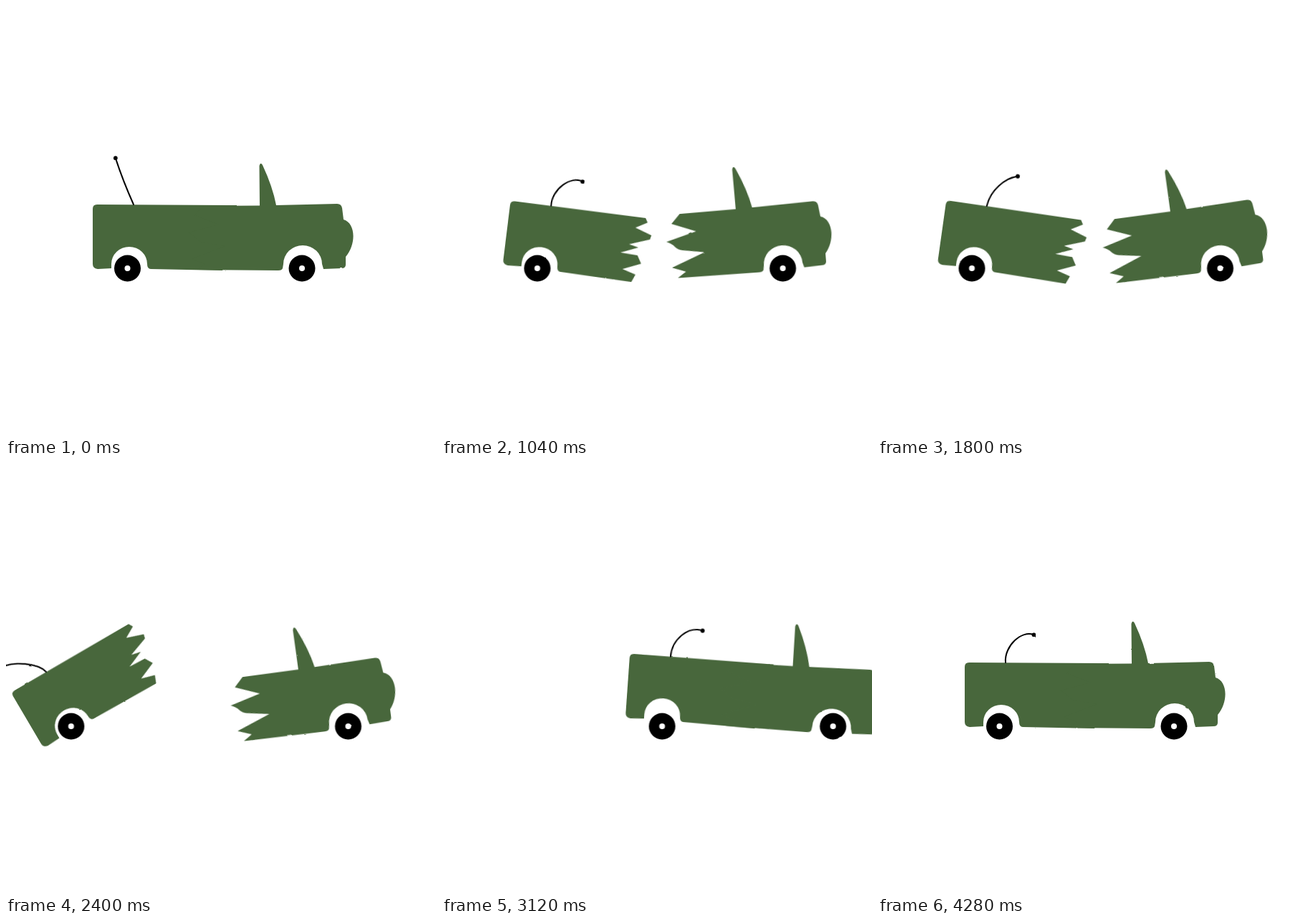
Animation, 600 px wide and 600 px high, one loop 4320 ms. Source, as an HTML page without scripts:

```html
<!DOCTYPE html>
<html lang="en">
<head>
<meta charset="utf-8">
<title>Bumper car</title>
<style>
html, body { margin: 0; width: 100%; height: 100%; overflow: hidden; background: #fff; }
svg { display: block; width: 100vw; height: 100vh; }
.body { fill: #48673c; }
.push, .tilt, .rear-x, .rear-turn, .front-x, .front-turn, .front-lag, .seam {
  animation: 4.32s linear infinite;
}
.push { animation-name: push; }
.tilt { animation-name: tilt; transform-origin: 300px 322px; }
.rear-x { animation-name: rear-x; }
.rear-turn { animation-name: rear-turn; transform-origin: 169.5px 366px; }
.front-x { animation-name: front-x; }
.front-turn { animation-name: front-turn; transform-origin: 413px 366px; }
.front-lag { animation-name: front-lag; }
.seam { animation-name: seam; animation-timing-function: step-end; }
.aerial {
  fill: none; stroke: #000; stroke-width: 2; stroke-linecap: round;
  animation: whip 1.08s linear infinite;
}

/* the joined car: shoved right, then rolling back */
@keyframes push {
  0%, 66.67% { transform: translateX(0); }
  67.59% { transform: translateX(95px); }
  69.44% { transform: translateX(118px); }
  72.22% { transform: translateX(137.5px); }
  75% { transform: translateX(145px); }
  78.7% { transform: translateX(116px); }
  80.56% { transform: translateX(72px); }
  83.33% { transform: translateX(15px); }
  86.11%, 100% { transform: translateX(0); }
}
@keyframes tilt {
  0%, 67.59% { transform: rotate(0); }
  69.44% { transform: rotate(2.2deg); }
  72.22% { transform: rotate(4deg); }
  75% { transform: rotate(4.2deg); }
  78.7% { transform: rotate(1deg); }
  80.56% { transform: translateY(2px) rotate(-2deg); }
  83.33% { transform: translateY(4px) rotate(-3deg); }
  86.11% { transform: translateY(1px) rotate(-1deg); }
  87.96%, 100% { transform: rotate(0); }
}

/* rear half: breaks off, rears up, charges */
@keyframes rear-x {
  0%, 16.2% { transform: translateX(0); animation-timing-function: ease-out; }
  24.07% { transform: translateX(-36.5px); }
  27.78%, 52.78% { transform: translateX(-38.5px); }
  55.56% { transform: translateX(-78.5px); }
  58.33% { transform: translateX(-100px); }
  61.11% { transform: translateX(-95px); animation-timing-function: ease-in; }
  64.81% { transform: translateX(-16px); }
  66.67% { transform: translateX(60px); }
  67.59%, 100% { transform: translateX(0); }
}
@keyframes rear-turn {
  0%, 16.2% { transform: rotate(0); animation-timing-function: ease-out; }
  24.07% { transform: rotate(7deg); }
  27.78%, 47.2% { transform: rotate(8deg); }
  52.78% { transform: rotate(12deg); }
  55.56% { transform: translate(3px, 5px) rotate(-30.5deg); }
  58.33% { transform: translate(3px, 5px) rotate(-36deg); }
  61.11% { transform: translate(3px, 5px) rotate(-30deg); }
  64.81% { transform: rotate(-8deg); }
  66.67%, 100% { transform: rotate(0); }
}

/* front half */
@keyframes front-x {
  0%, 16.2% { transform: translateX(0); animation-timing-function: ease-out; }
  24.07% { transform: translateX(62.5px); }
  27.78%, 66.67% { transform: translateX(64.5px); }
  67.59%, 100% { transform: translateX(0); }
}
@keyframes front-turn {
  0%, 16.2% { transform: rotate(0); animation-timing-function: ease-out; }
  24.07% { transform: rotate(-4.5deg); }
  27.78%, 65.74% { transform: rotate(-7.3deg); }
  67.59%, 100% { transform: rotate(0); }
}
@keyframes front-lag {
  0%, 67.59%, 80.56%, 100% { transform: translateX(0); }
  72.22%, 75% { transform: translateX(-5px); }
}
@keyframes seam {
  0%, 67% { visibility: visible; }
  16.4% { visibility: hidden; }
}

@keyframes whip {
  0%, 100% { d: path("M178 277C169 257 160 234 153 212"); }
  7.4% { d: path("M178 277C172 260 152 232 136 225"); }
  22%, 34% { d: path("M178 277C175 262 147 240 126 240"); }
  46% { d: path("M178 277C175 261 148 237 128 237"); }
  52% { d: path("M178 277C178 255 172 230 165 209"); }
  58% { d: path("M178 277C180 255 187 230 200 217"); }
  66.7% { d: path("M178 277C180 255 197 235 215 230"); }
  89% { d: path("M178 277C178 254 199 232 220 238"); }
  96.3% { d: path("M178 277C176 254 202 231 219 239"); }
}
</style>
</head>
<body>
<svg viewBox="0 0 600 600">
  <defs>
    <!-- rough, restless ink edge -->
    <filter id="ink" filterUnits="userSpaceOnUse" x="0" y="0" width="600" height="600" color-interpolation-filters="sRGB">
      <feTurbulence type="fractalNoise" baseFrequency=".08" numOctaves="2" seed="1">
        <animate attributeName="seed" values="1;2;3;4" dur=".32s" calcMode="discrete" repeatCount="indefinite"/>
      </feTurbulence>
      <feDisplacementMap in="SourceGraphic" scale="1.6" xChannelSelector="R" yChannelSelector="G"/>
    </filter>
    <marker id="knob" viewBox="-3 -3 6 6" markerWidth="6" markerHeight="6" markerUnits="userSpaceOnUse">
      <circle r="2.9"/>
    </marker>
    <g id="wheel">
      <circle r="18.5"/>
      <circle r="4" fill="#fff"/>
    </g>
  </defs>

  <g filter="url(#ink)">
    <g class="push">
      <g class="tilt">
        <g class="rear-x"><g class="rear-turn">
          <path class="body" d="M121 283Q121 277 127 277L311 278 314.5 284 298.5 293 322 301 320.5 307 292.5 317 306 320 282 330 306 331 312.5 342 287.5 352.5 306.5 358 302 369 202 367Q197 367 197 360A25 24 0 0 0 147 360V366L128 367Q121 366 121 360Z"/>
          <path class="body seam" d="M268 278H322V368H268Z"/>
          <path class="aerial" marker-end="url(#knob)" d="M178 277C169 257 160 234 153 212"/>
        </g></g>
        <g class="front-x"><g class="front-lag"><g class="front-turn">
          <path class="body" d="M275.5 279L354 278.5 353.5 223Q355 217 358 222 372 252 377 278L462 276Q468 276 469 282L471 298C488 303 489 332 474 350V361Q474 366 468 366L443 367 441 360A27 26 0 0 0 387 360L386 366Q385 369 380 369L266 368 278 360 259 353 306 335 276 330Q269 329 265 324 261 319 254 316.5L296.5 305 263 292Z"/>
        </g></g></g>
      </g>
      <g class="rear-x"><use href="#wheel" x="169.5" y="366"/></g>
      <g class="front-x"><g class="front-lag"><use href="#wheel" x="413" y="366"/></g></g>
    </g>
  </g>
</svg>
</body>
</html>
```
